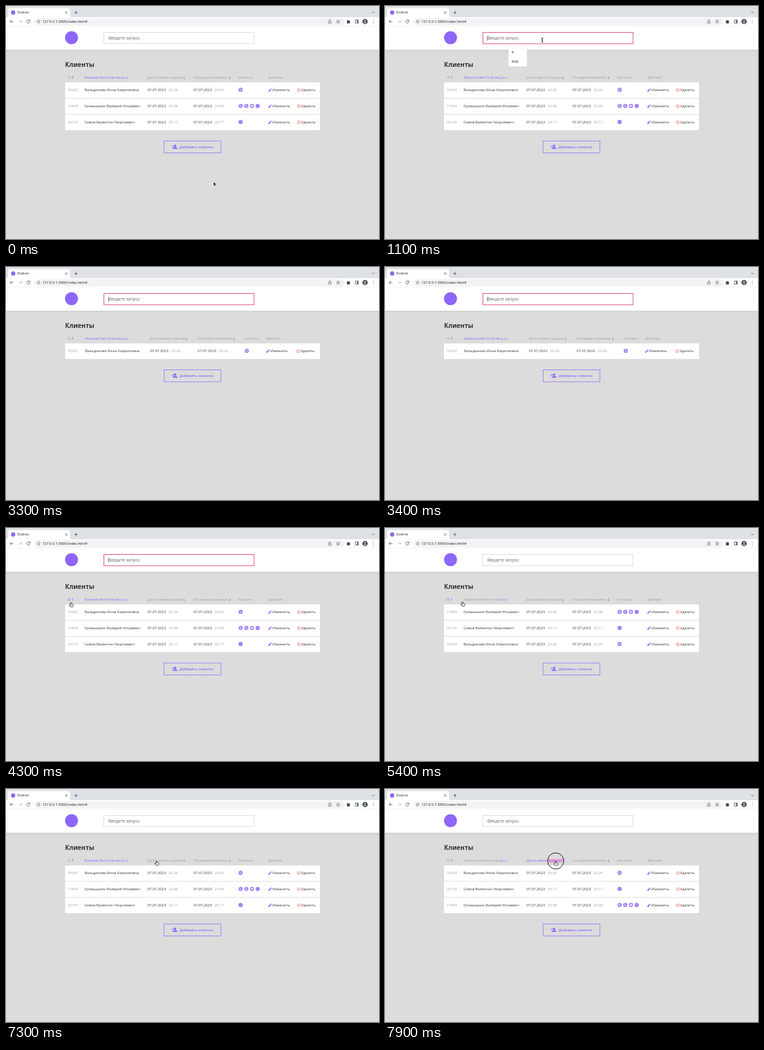
An HTML page for the animation above (8 s loop, 600 by 375 pixels).

```html
<!DOCTYPE html>
<html lang="ru">
<head>
<meta charset="utf-8">
<title>Studivex</title>
<style>
  html, body { margin: 0; width: 100%; height: 100%; overflow: hidden; background: #dcdcdc; }
  svg { display: block; width: 100vw; height: 100vh; }
  text { font-family: "Open Sans", sans-serif; white-space: pre; }
  .ui { font-family: Roboto, sans-serif; }
</style>
</head>
<body>
<svg viewBox="0 0 600 375" xmlns="http://www.w3.org/2000/svg">
  <defs>
    <linearGradient id="shade" x1="0" y1="0" x2="0" y2="1">
      <stop offset="0" stop-color="#c9c9c9"/><stop offset="1" stop-color="#dcdcdc"/>
    </linearGradient>
    <g id="disc"><circle r="3.4" fill="#a284f8"/></g>
    <g id="phone"><use href="#disc"/><path d="M-1.2-1.6C-1.5 0 0 1.6 1.5 1.3" fill="none" stroke="#fff" stroke-width=".9" stroke-linecap="round"/></g>
    <g id="mail"><use href="#disc"/><rect x="-1.7" y="-1.2" width="3.4" height="2.5" rx=".3" fill="#fff"/><path d="M-1.5-.9 0 .2 1.5-.9" fill="none" stroke="#a284f8" stroke-width=".4"/></g>
    <g id="pencil" fill="#8d66fb"><path d="M0 5.2V3.9L3.6.3 4.9 1.6 1.3 5.2ZM4-.1 4.5-.6 5.8.7 5.3 1.2Z"/></g>
    <g id="remove" fill="none" stroke="#ee6b53" stroke-width=".65"><circle r="2.5"/><path d="M-1-1 1 1M1-1-1 1"/></g>
    <path id="arrow" d="M0 0V6.4L1.5 5 2.5 7.2 3.5 6.8 2.5 4.6H4.5Z" fill="#000" stroke="#fff" stroke-width=".5"/>
    <g id="ibeam" fill="none" stroke-linecap="round">
      <path d="M-1.2-3.6Q0-3.6 0-2.8V2.8Q0 3.6-1.2 3.6M1.2-3.6Q0-3.6 0-2.8V2.8Q0 3.6 1.2 3.6" stroke="#222" stroke-width=".8"/>
    </g>
    <path id="hand" d="M-.7.6Q0-.5.7.6V2.8L3.3 3.4Q3.9 3.7 3.7 4.6L3 7.2H-.8L-2.7 4.6Q-2.8 3.5-1.7 3.9L-.7 4.7Z" fill="#fff" stroke="#111" stroke-width=".75" stroke-linejoin="round"/>
  </defs>

  <rect width="600" height="375" fill="#dcdcdc"/>
  <rect y="70" width="600" height="4" fill="url(#shade)"/>

  <g id="browser" fill="none" stroke="#54575b" stroke-width=".85">
    <rect width="600" height="18" fill="#dee1e6" stroke="none"/>
    <path d="M0 18.5Q3.5 18 3.5 14.5V7Q3.5 3.5 7 3.5H99.5Q103 3.5 103 7V14.5Q103 18 106.5 18.5Z" fill="#fff" stroke="none"/>
    <rect y="18" width="600" height="52.5" fill="#fff" stroke="none"/>
    <path d="M0 32.2H600" stroke="#e3e4e6" stroke-width=".5"/>
    <circle cx="11.5" cy="10.5" r="3.4" fill="#8d66fb" stroke="none"/>
    <text class="ui" x="18" y="12.3" font-size="5.1" fill="#3c4043" stroke="none">Studivex</text>
    <path d="M95.2 8.8 98.6 12.2M98.6 8.8 95.2 12.2M109.8 10.5H115.2M112.5 7.8V13.2M589 9.3 590.9 11.2 592.8 9.3"/>
    <rect x="45.5" y="19.5" width="499" height="11.4" rx="5.7" fill="#f1f3f4" stroke="none"/>
    <path d="M11.7 25H6.7M9 22.6 6.6 25 9 27.4"/>
    <path d="M20.6 25H25.6M23.3 22.6 25.7 25 23.3 27.4" stroke="#b6b9bd"/>
    <path d="M38 23.5A2.5 2.5 0 1 0 38.4 25.6M38.5 22.2V24.1H36.6"/>
    <g stroke-width=".6"><circle cx="52.5" cy="25" r="2.2"/><path d="M52.5 24.8V26.3M52.5 23.6V24.1"/></g>
    <text class="ui" x="58.7" y="27.1" font-size="5.85" fill="#303235" stroke="none">127.0.0.1:5500/index.html#</text>
    <path d="M519.6 24H518.8V27.8H523V24H522.2M520.9 26V21.9M519.7 23 520.9 21.8 522.1 23" stroke-width=".65"/>
    <path d="M534.3 22.2 535.1 24.1 537.1 24.3 535.6 25.6 536 27.6 534.3 26.5 532.6 27.6 533 25.6 531.5 24.3 533.5 24.1Z" stroke-width=".65"/>
    <path d="M548.2 23.3H549.8A1 1 0 0 1 551.6 23.3H553V24.8A1 1 0 0 1 553 26.6V28H548.2V26.5A.8.8 0 0 0 548.2 24.9Z" fill="#45484c" stroke="none"/>
    <rect x="562" y="22.6" width="4.8" height="4.8"/><path d="M565.5 22.6V27.4" stroke-width="1.7"/>
    <circle cx="577.6" cy="25" r="4.3" fill="#4b5059" stroke="none"/>
    <path d="M575 27.8Q577.6 24.4 580.2 27.8ZM579 23.8A1.4 1.4 0 1 0 576.2 23.8 1.4 1.4 0 0 0 579 23.8" fill="#c7cbd2" stroke="none"/>
    <path d="M591 22.8V22.81M591 25V25.01M591 27.2V27.21" stroke-width="1.1" stroke-linecap="round"/>
  </g>

  <circle cx="105.4" cy="51" r="10.5" fill="#8d66fb"/>
  <rect id="field" x="157.5" y="42.5" width="241.5" height="18.3" fill="#fff"/>
  <text id="query" x="164.8" y="54.2" font-size="6.67"></text>
  <path id="caret" stroke="#222" stroke-width=".6"/>
  <text x="95" y="97.7" font-size="10" font-weight="700" fill="#303030">Клиенты</text>
  <g id="table"></g>
  <g id="add">
    <rect x="254.2" y="217.2" width="91.6" height="19.4" fill="none" stroke="#8d66fb" stroke-width=".75"/>
    <g fill="#8d66fb"><circle cx="272" cy="225" r="1.9"/><path d="M268.3 230V229Q268.6 227.4 272 227.3 275.4 227.4 275.7 229V230Z"/></g>
    <path d="M268.2 224.3V227.5M266.6 225.9H269.8" stroke="#8d66fb" stroke-width=".75"/>
    <text x="279.2" y="229.1" font-size="5.83" font-weight="600" fill="#8d66fb">Добавить клиента</text>
  </g>
  <g id="menu">
    <rect x="198" y="65.6" width="31" height="33" rx="1.8" fill="#bbb" opacity=".55"/>
    <rect x="198.5" y="65.3" width="30" height="32.4" rx="1.4" fill="#fff"/>
    <text class="ui" x="204" y="75.5" font-size="5.5" fill="#222">ё</text>
    <text class="ui" x="204" y="91" font-size="5.5" fill="#222">ktcjr</text>
  </g>
  <circle id="ring" r="13" fill="none" stroke="#161616" stroke-width="1"/>
  <use id="cursor"/>
</svg>
<script>
const PURPLE = '#8d66fb', GREY = '#a1a1a3';
const $ = id => document.getElementById(id);

const clients = {
  v: { id: '765267', name: 'Вальдинова Инна Кирилловна', time: '20:26', icons: ['phone'] },
  g: { id: '714943', name: 'Громышкин Валерий Игоревич', time: '20:08', icons: ['phone', 'phone', 'mail', 'disc'] },
  s: { id: '252141', name: 'Сивов Валентин Георгиевич', time: '20:17', icons: ['disc'] }
};
const wide = { name: 126.2, made: 227.5, edited: 301.5, contacts: 374, icon: 377.4, actions: 422, edit: 422, remove: 471 };
const narrow = { name: 127.2, made: 231.5, edited: 308.3, contacts: 383.6, icon: 387.3, actions: 418.8, edit: 418.5, remove: 469.6 };

// Each entry overrides the state from its time on.
const changes = [
  [0, { rows: 'vgs', sort: 'name', idUp: true, nameUp: false, madeUp: false, hover: '', focus: false, typed: '', menu: false, pick: false, shape: 'arrow' }],
  [600, { shape: 'ibeam' }],
  [700, { focus: true }],
  [1000, { menu: true }],
  [1200, { typed: 'в', menu: false, shape: '' }],
  [1300, { typed: 'ва' }],
  [1400, { typed: 'вал' }],
  [2000, { rows: 'v' }],
  [2800, { typed: 'ва' }],
  [3100, { typed: '' }],
  [3500, { rows: 'vgs' }],
  [3700, { shape: 'arrow' }],
  [4200, { shape: 'hand', hover: 'id' }],
  [4500, { focus: false }],
  [4600, { rows: 'vsg', sort: 'id', idUp: false }],
  [5100, { rows: 'gsv', idUp: true }],
  [5400, { hover: '' }],
  [5600, { hover: 'name' }],
  [6000, { rows: 'sgv', sort: 'name', nameUp: true }],
  [6700, { rows: 'vgs', nameUp: false }],
  [7200, { hover: '' }],
  [7400, { hover: 'made' }],
  [7600, { rows: 'vsg', sort: 'made', madeUp: true }],
  [7900, { pick: true }]
];
const path = [
  [0, 334, 283], [700, 253, 55], [3600, 253, 55], [4300, 104.5, 119.6], [4500, 104.5, 116],
  [5200, 104.5, 116], [5400, 124.6, 118.6], [5800, 149, 114.4], [6900, 149, 114.4], [7500, 274.6, 115.8], [8000, 274.6, 115.8]
];
const clicks = [[700, 900], [4500, 4700], [4900, 5200], [5900, 6100], [6500, 6700], [7500, 7700], [7900, 8000]];

const text = (x, y, size, fill, value) => `<text x="${x}" y="${y}" font-size="${size}" fill="${fill}">${value}</text>`;
const use = (id, x, y) => `<use href="#${id}" x="${x}" y="${y}"/>`;
const pointer = (x, up) => `<path d="M${x} 113V117.4M${x - 1.1} ${up ? 114.2 : 116.2} ${x} ${up ? 113 : 117.4} ${x + 1.1} ${up ? 114.2 : 116.2}" fill="none" stroke="${PURPLE}" stroke-width=".65"/>`;

function header(s, c) {
  const tint = key => s.sort === key || s.hover === key ? PURPLE : GREY;
  const label = (x, fill, value) => text(x, 117.3, 5, fill, value);
  return (s.pick ? '<rect x="261.5" y="112.4" width="23.5" height="6.2" fill="#f0a6d6"/>' : '') +
    label(99, tint('id'), 'ID') + pointer(107, s.idUp) +
    label(c.name, tint('name'), 'Фамилия Имя Отчество') + pointer(c.name + 60.6, s.nameUp) +
    text(c.name + 63.2, 117, 4, PURPLE, s.nameUp ? 'Я-А' : 'А-Я') +
    label(c.made, tint('made'), 'Дата и время создания') + pointer(c.made + 58.8, s.madeUp) +
    label(c.edited, GREY, 'Последнее изменение') + pointer(c.edited + 58.2, false) +
    label(c.contacts, GREY, 'Контакты') + label(c.actions, GREY, 'Действия');
}

function row(client, i, c) {
  const top = 123 + i * 25.9, base = top + 14.4, mid = top + 12.4;
  const stamp = x => text(x, base, 5.83, '#333', '07.07.2023') + text(x + 34, base, 5.83, GREY, client.time);
  return `<rect x="95" y="${top}" width="410" height="25" fill="#fff"/>` +
    text(99, base - .3, 5, GREY, client.id) + text(c.name, base, 5.83, '#333', client.name) +
    stamp(c.made) + stamp(c.edited) +
    client.icons.map((icon, n) => use(icon, c.icon + n * 9.15, mid - .5)).join('') +
    use('pencil', c.edit, mid - 2.5) + text(c.edit + 6.6, base, 5.83, '#333', 'Изменить') +
    use('remove', c.remove, mid) + text(c.remove + 3.8, base, 5.83, '#333', 'Удалить');
}

function position(t) {
  const i = path.findIndex((p, n) => n && t <= p[0]);
  const [t0, x0, y0] = path[i - 1], [t1, x1, y1] = path[i];
  const u = (t - t0) / (t1 - t0), e = u * u * (3 - 2 * u);
  return [x0 + (x1 - x0) * e, y0 + (y1 - y0) * e];
}

const set = (id, attrs) => Object.entries(attrs).forEach(([k, v]) => $(id).setAttribute(k, v));
const show = (id, on) => set(id, { display: on ? 'inline' : 'none' });
let drawn = '';

function render(t) {
  const s = Object.assign({}, ...changes.filter(([at]) => at <= t).map(([, change]) => change));
  const key = JSON.stringify(s);
  if (key !== drawn) {
    drawn = key;
    const single = s.rows.length === 1, cols = single ? narrow : wide;
    $('table').innerHTML = header(s, cols) + [...s.rows].map((k, i) => row(clients[k], i, cols)).join('');
    set('add', { transform: `translate(0 ${single ? -51.8 : 0})` });
    set('field', { stroke: s.focus ? '#e34a87' : '#c6c6c8', 'stroke-width': s.focus ? 1 : .6 });
    set('query', { fill: s.typed ? '#333' : '#67676a' });
    $('query').textContent = s.typed || 'Введите запрос';
    const x = 165 + (s.typed ? $('query').getComputedTextLength() : 0);
    set('caret', { d: `M${x} 48V55.8` });
    show('caret', s.focus);
    show('menu', s.menu);
    show('cursor', s.shape);
    if (s.shape) set('cursor', { href: '#' + s.shape });
  }
  const [x, y] = position(t);
  set('cursor', { x, y });
  set('ring', { cx: x, cy: y });
  show('ring', clicks.some(([from, to]) => t >= from && t < to));
}

const start = performance.now();
function tick() {
  const t = (performance.now() - start) % 8000;
  render(Math.floor(t / 100) * 100);
  requestAnimationFrame(tick);
}
render(0);
tick();
</script>
</body>
</html>
```
